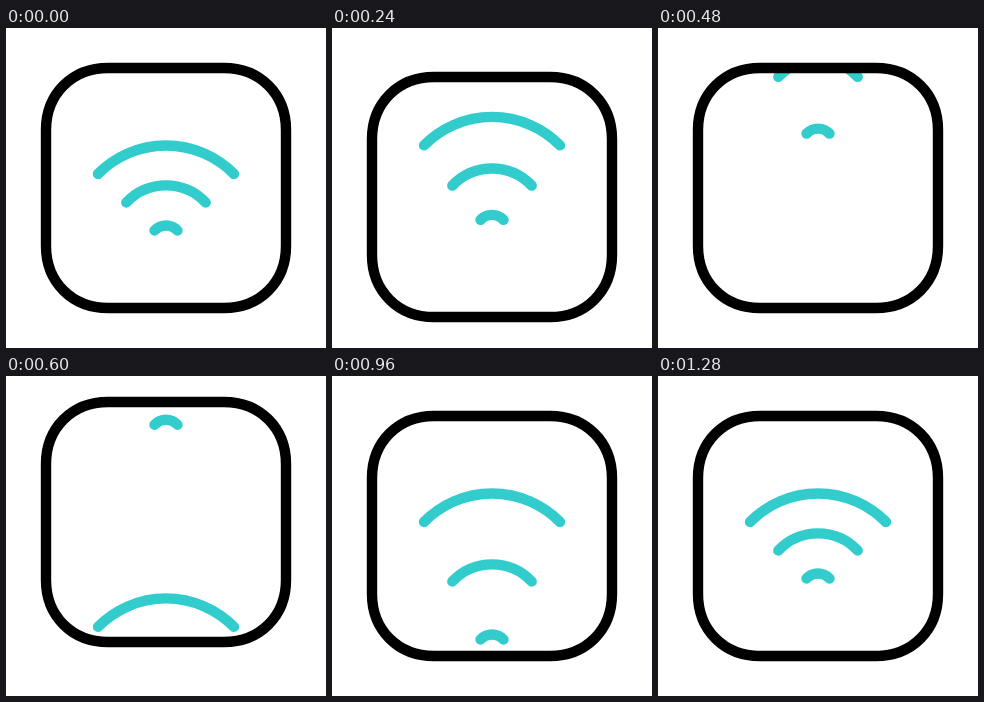
Animation, 320 px wide and 320 px high, one loop 1480 ms. Source, as an HTML page:

```html
<!DOCTYPE html>
<html lang="en">
<head>
<meta charset="utf-8">
<title>Wi-Fi loop</title>
<style>
  html, body { margin: 0; width: 100%; height: 100%; overflow: hidden; background: #fff; }
  svg { display: block; width: 100%; height: 100%; }
  path { fill: none; stroke-width: 10.4; }
  .wave { stroke: #32cccd; stroke-linecap: round; }
  .frame { stroke: #000; }
</style>
</head>
<body>
<svg viewBox="0 0 320 320">
  <defs>
    <path id="shape" d="M102 40H218C254 40 280 66 280 102V218C280 254 254 280 218 280H102C66 280 40 254 40 218V102C40 66 66 40 102 40Z"/>
    <clipPath id="inside"><use href="#shape"/></clipPath>
  </defs>
  <g id="box">
    <g clip-path="url(#inside)">
      <path class="wave" d="M92 146A95.4 95.4 0 0 1 228 146"/>
      <path class="wave" d="M120.3 174.5A54.5 54.5 0 0 1 199.7 174.5"/>
      <path class="wave" d="M148.5 202.5A15.7 15.7 0 0 1 171.5 202.5"/>
    </g>
    <use class="frame" href="#shape"/>
  </g>
</svg>
<script>
const LOOP = 1480, STEP = 40;

// The box dips, springs up and settles: [time, y]
const boxKeys = [[60, 0], [360, 14], [600, -14], [960, 0]];

// Each wave leaves through the top, then returns from below.
const waves = [
  { start: 62, span: 900, rise: 370, swap: 500, end: 960, near: 43.5, lead: 160, power: 1.24 },
  { start: 70, span: 1060, rise: 377, swap: 600, end: 1120, near: 31, lead: 160, power: 1.33 },
  { start: 83, span: 800, rise: 196, swap: 740, end: 1280, near: 16, lead: 120, power: 1.365 }
];

const box = document.getElementById('box');
const paths = document.querySelectorAll('.wave');

const smooth = u => {
  u = Math.min(1, Math.max(0, u));
  return u * u * (3 - 2 * u);
};

const boxY = t => boxKeys.slice(1).reduce((y, [time, value], i) => {
  const [from, last] = boxKeys[i];
  return y + (value - last) * smooth((t - from) / (time - from));
}, 0);

const waveY = (w, t) => t < w.swap
  ? -w.rise * smooth((t - w.start) / w.span)
  : w.near * Math.pow(Math.max(0, w.end - t) / w.lead, w.power);

const moveY = (el, y) => el.setAttribute('transform', `translate(0 ${y.toFixed(2)})`);

function draw(t) {
  moveY(box, boxY(t));
  waves.forEach((w, i) => moveY(paths[i], waveY(w, t)));
}

const origin = performance.now();
function tick(now) {
  const t = Math.max(0, now - origin) % LOOP;
  draw(Math.floor(t / STEP) * STEP);
  requestAnimationFrame(tick);
}
draw(0);
requestAnimationFrame(tick);
</script>
</body>
</html>
```
